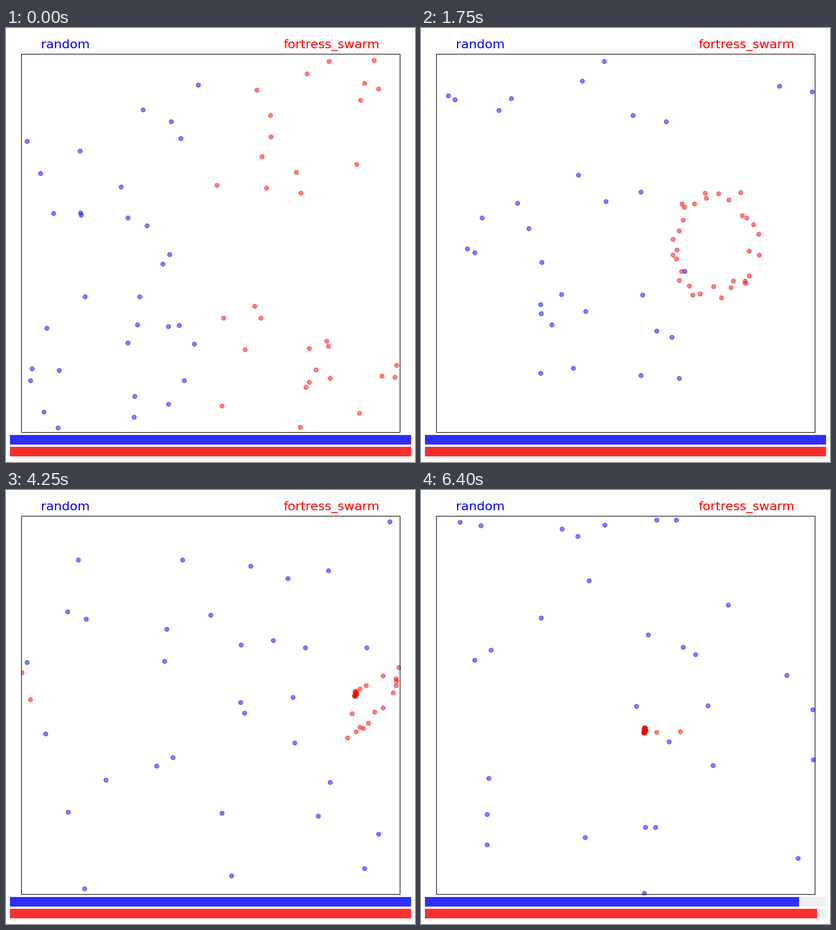
Animation, 726 px wide and 771 px high, one loop 6.45 s. Source, as a matplotlib script:

```python
import numpy as np
import matplotlib.pyplot as plt
from matplotlib.animation import FuncAnimation
from matplotlib.patches import Rectangle

W, H, DPI = 726, 771, 72
FRAMES, INTERVAL = 129, 50
N = 32  # dots per team
ORIGIN, SIDE = np.array([28, 47]), 671
STEP = 0.01 * SIDE  # top speed per axis and frame
rng = np.random.default_rng(7)


def wrap(p):
    return (p - ORIGIN) % SIDE + ORIGIN


# Red team: starts in two bands, gathers into a ring, then collapses on a core
start = np.column_stack([
    rng.uniform(372, 694, N),
    np.r_[rng.uniform(56, 325, N // 2 - 1), rng.uniform(480, 714, N // 2 + 1)]])
dx, dy = (start - (535, 390)).T
start = start[np.argsort(np.arctan2(dy, dx))]

theta = np.linspace(-np.pi, np.pi, N, endpoint=False) + rng.normal(0, 0.08, N)
spread = rng.uniform(0.8, 1.1, N)
jitter = rng.normal(0, 1, (N, 2)) * (1.5, 3)

# The left of the ring folds in first, the right trails behind
order = np.argsort(np.cos(theta))
lag = np.empty(N)
lag[order] = np.linspace(0, 1, N) ** 3
stray = order[-1]

KEY_TIMES = [0, 35, 67, 85, 102, 128]
KEYS = dict(
    cx=[517, 517, 577, 645, 575, 430],
    cy=[387, 387, 340, 375, 403, 428],
    rx=[78, 78, 65, 30, 25, 28],
    ry=[90, 90, 62, 66, 8, 4],
    shear=[0, 0, 0, -45, 0, 0],
    core_x=[517, 517, 560, 620, 542, 397],
    core_y=[387, 387, 340, 362, 403, 427],
    fold=[0, 0, 0, 0.2, 0.4, 0.9])


def red_at(f):
    k = {name: np.interp(f, KEY_TIMES, v) for name, v in KEYS.items()}
    ring = np.column_stack([
        k["cx"] + spread * (k["rx"] * np.cos(theta) + k["shear"] * np.sin(theta)),
        k["cy"] + spread * k["ry"] * np.sin(theta)])
    core = (k["core_x"], k["core_y"]) + jitter
    pull = np.clip(8 * (k["fold"] - lag), 0, 1)[:, None]
    goal = ring + pull * (core - ring)
    return start + np.clip(goal - start, -STEP * f, STEP * f)


STRAY_LEAVES, STRAY_LOST = 75, 109
exit_point = red_at(STRAY_LEAVES)[stray]


def red_dots_at(f):
    p = red_at(f)
    t = f - STRAY_LEAVES
    if t > 0:
        p[stray] = exit_point + (STEP * t, 0.1 * t**2)
    if f >= STRAY_LOST:
        p[stray] = np.nan
    return wrap(p)


# Blue team: random walkers from the left half
home = np.column_stack([rng.uniform(30, 354, N),
                        716 - 662 * rng.uniform(0, 1, N) ** 1.3])
velocity = rng.normal((1.2, -0.8), 3, (N, 2)) + np.cumsum(
    rng.normal(0, 0.5, (FRAMES, N, 2)), axis=0)
velocity = np.clip(velocity, -STEP, STEP)
velocity[0] = 0
blue_track = wrap(home + np.cumsum(velocity, axis=0))

# The swarm removes the nearest walker at these times
for f in (97, 116):
    gap = np.linalg.norm(blue_track[f] - red_at(f)[order[0]], axis=1)
    blue_track[f:, np.nanargmin(gap)] = np.nan


# Right edge of each health bar
def blue_edge(f):
    return np.interp(f, [86, 102, 128], [719, 691.5, 671])


def red_edge(f):
    return np.interp(f, [87, 102, 108, 109, 128], [719, 700, 697, 709, 703])


fig = plt.figure(figsize=(W / DPI, H / DPI), dpi=DPI, facecolor="white")
ax = fig.add_axes([0, 0, 1, 1])
ax.set_xlim(0, W)
ax.set_ylim(H, 0)
ax.axis("off")

for x, name, color in ((105, "random", "blue"), (578, "fortress_swarm", "red")):
    ax.text(x, 36, name, color=color, size=22.4, ha="center", va="baseline",
            family="DejaVu Sans")

arena = Rectangle((27.5, 46.5), SIDE + 1, SIDE + 1, fc="none", ec="black",
                  lw=1.1, zorder=5, snap=False)
ax.add_patch(arena)


def dots(color):
    line, = ax.plot([], [], "o", color=color, alpha=0.5, ms=7.5, mew=1.2)
    line.set_clip_path(arena)
    return line


def bar(top, color):
    ax.add_patch(Rectangle((7, top), 712, 17, fc="#f0f0f0", ec="none"))
    return ax.add_patch(Rectangle((7, top), 712, 17, fc=color, ec="none"))


blue_dots, red_dots = dots("blue"), dots("red")
blue_bar, red_bar = bar(723, "#2e2eff"), bar(744, "#ff2e2e")


def update(f):
    blue_dots.set_data(*blue_track[f].T)
    red_dots.set_data(*red_dots_at(f).T)
    blue_bar.set_width(blue_edge(f) - 7)
    red_bar.set_width(red_edge(f) - 7)
    return blue_dots, red_dots, blue_bar, red_bar


anim = FuncAnimation(fig, update, frames=FRAMES, interval=INTERVAL,
                     init_func=lambda: update(0), repeat=True, repeat_delay=0)
plt.show()
```
